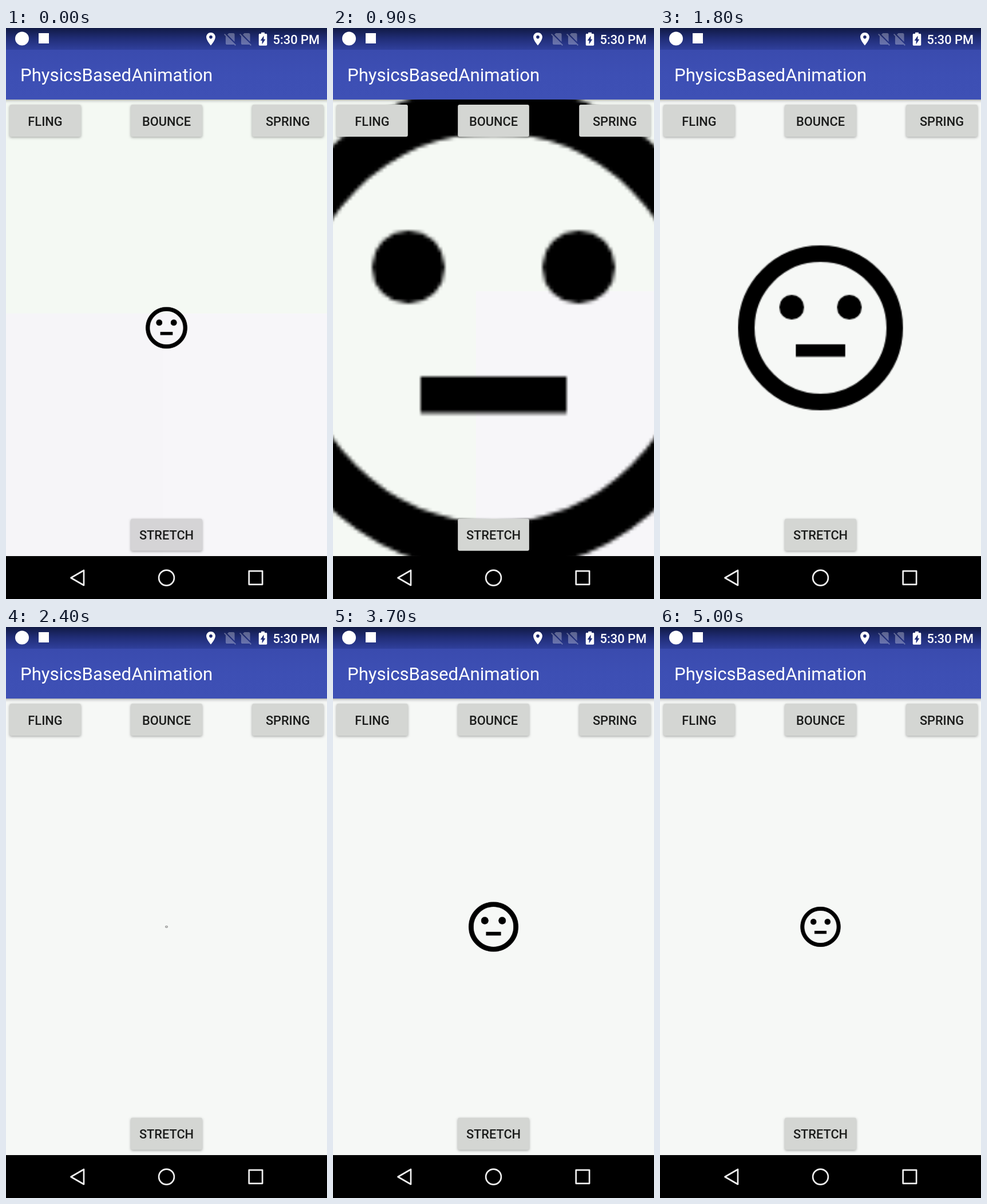
An HTML page with a canvas that plays this animation: 561x998 px, repeating every 5.1 s.

```html
<!DOCTYPE html>
<html lang="en">
<head>
<meta charset="utf-8">
<title>Spring stretch</title>
<style>
html, body { margin: 0; width: 100%; height: 100%; overflow: hidden; background: #000; }
canvas { display: block; }
</style>
</head>
<body>
<canvas id="stage" width="561" height="998"></canvas>
<script>
const W = 561, TOP = 125, BOTTOM = 923, CX = 280.5, CY = 524;
const LOOP = 5100, STEP = 100, START = 0.703;
const DP = W / 360;
const ctx = document.getElementById('stage').getContext('2d');

const PIN = new Path2D('M12 2C8.13 2 5 5.13 5 9c0 5.25 7 13 7 13s7-7.75 7-13c0-3.87-3.13-7-7-7zm0 9.5a2.5 2.5 0 0 1 0-5 2.5 2.5 0 0 1 0 5z');
const NO_SIM = new Path2D('M18.99 5c0-1.1-.89-2-1.99-2h-7L7.66 5.34 19 16.68zM3.65 3.88L2.38 5.15 5 7.77V19c0 1.1.9 2 2 2h10.01c.35 0 .67-.1.96-.26l1.88 1.88 1.27-1.27z');
const BATTERY = new Path2D('M15.67 4H14V2h-4v2H8.33C7.6 4 7 4.6 7 5.33v15.33C7 21.4 7.6 22 8.33 22h7.33c.74 0 1.34-.6 1.34-1.33V5.33C17 4.6 16.4 4 15.67 4zM11 20v-5.5H9L13 7v5.5h2z');

// The face is a 56dp bitmap at 3x density, so it softens as it is stretched.
const FACE = 56 * DP;
const face = makeFace(168);

function makeFace(size) {
  const c = document.createElement('canvas');
  c.width = c.height = size;
  const g = c.getContext('2d');
  g.scale(size / 24, size / 24);
  g.lineWidth = 2;
  g.beginPath();
  g.arc(12, 12, 9, 0, 7);
  g.stroke();
  for (const x of [8.5, 15.5]) {
    g.beginPath();
    g.arc(x, 9.5, 1.5, 0, 7);
    g.fill();
  }
  g.fillRect(9, 14, 6, 1.5);
  return c;
}

// Underdamped spring: stiffness 50, damping ratio 0.2, start velocity 100/s.
function springScale(t) {
  const s = t - START;
  if (s <= 0) return 1;
  const w = Math.sqrt(50), z = 0.2, wd = w * Math.sqrt(1 - z * z);
  return 1 + 100 / wd * Math.exp(-z * w * s) * Math.sin(wd * s);
}

function rect(color, x, y, w, h) {
  ctx.fillStyle = color;
  ctx.fillRect(x, y, w, h);
}

function label(str, x, y, weight, size, color, align) {
  ctx.font = `${weight} ${size}px Roboto, sans-serif`;
  ctx.textAlign = align;
  ctx.fillStyle = color;
  ctx.fillText(str, x, y);
}

function icon(path, x, y, sx, sy, color) {
  ctx.save();
  ctx.translate(x, y);
  ctx.scale(sx, sy);
  ctx.fillStyle = color;
  ctx.fill(path, 'evenodd');
  ctx.restore();
}

function gradient(y0, y1, ...colors) {
  const g = ctx.createLinearGradient(0, y0, 0, y1);
  colors.forEach((c, i) => g.addColorStop(i / (colors.length - 1), c));
  return g;
}

function background(t) {
  const h = BOTTOM - TOP;
  if (t >= 1.2) {
    rect('#f6f8f6', 0, TOP, W, h);
  } else if (t >= 0.8) {
    rect('#f5f9f4', 0, TOP, W, h);
    rect('#f7f6f9', 250, 460, W - 250, BOTTOM - 460);
  } else {
    rect('#f4f9f3', 0, TOP, W, h);
    rect('#f7f6f9', 0, 499, W, BOTTOM - 499);
    rect('#f6f5f8', 0, 499, 275, BOTTOM - 499);
  }
}

function drawFace(scale) {
  ctx.save();
  ctx.translate(CX, CY);
  ctx.scale(scale, scale);
  ctx.imageSmoothingQuality = Math.abs(scale) > 2 ? 'low' : 'high';
  ctx.drawImage(face, -FACE / 2, -FACE / 2, FACE, FACE);
  ctx.restore();
}

function button(str, cx, y, color) {
  const w = 80 * DP, h = 36 * DP;
  ctx.save();
  ctx.shadowColor = 'rgba(0,0,0,.32)';
  ctx.shadowBlur = 4;
  ctx.shadowOffsetY = 1.5;
  ctx.fillStyle = color;
  ctx.beginPath();
  ctx.roundRect(cx - w / 2, y, w, h, 3);
  ctx.fill();
  ctx.restore();
  label(str, cx, y + 36.7, 500, 14 * DP, '#1b1c1b', 'center');
}

function statusBar() {
  rect(gradient(0, 38, '#111a45', '#212e78', '#30409c'), 0, 0, W, 38);
  ctx.fillStyle = '#fff';
  ctx.beginPath();
  ctx.arc(28, 18.5, 12, 0, 7);
  ctx.fill();
  ctx.fillRect(57, 9, 18, 18);
  icon(PIN, 344.4, 5.7, 1.13, 1.13, '#fff');
  for (const x of [378.3, 405.3]) icon(NO_SIM, x, 5.6, 1.12, 1.12, 'rgba(255,255,255,.3)');
  icon(BATTERY, 431.6, 5.4, 1.45, 1.15, '#fff');
  label('5:30 PM', 548, 27.5, 500, 14 * DP, '#fff', 'right');
}

function toolbar() {
  rect(gradient(TOP, TOP + 7, 'rgba(0,0,0,.26)', 'rgba(0,0,0,.07)', 'rgba(0,0,0,0)'), 0, TOP, W, 7);
  rect(gradient(38, TOP, '#3a4bae', '#3d4fb4', '#3e50b5'), 0, 38, W, TOP - 38);
  label('PhysicsBasedAnimation', 25, 93, 400, 20 * DP, '#fff', 'left');
}

function navBar() {
  rect('#000', 0, BOTTOM, W, 998 - BOTTOM);
  ctx.strokeStyle = '#f0f0f0';
  ctx.lineWidth = 2.7;
  ctx.lineJoin = 'round';
  ctx.beginPath();
  ctx.moveTo(113.5, 961);
  ctx.lineTo(136, 948);
  ctx.lineTo(136, 974);
  ctx.closePath();
  ctx.stroke();
  ctx.beginPath();
  ctx.arc(CX, 961, 13.4, 0, 7);
  ctx.stroke();
  ctx.strokeRect(424.7, 949.2, 23.4, 23.4);
}

function draw(t) {
  background(t);
  drawFace(springScale(t));
  const gray = '#d4d6d3';
  button('FLING', 68.5, 134, gray);
  button('BOUNCE', CX, 134, gray);
  button('SPRING', 492.5, 134, gray);
  button('STRETCH', CX, 857.7, t < 0.8 ? '#d5d4d6' : gray);
  toolbar();
  statusBar();
  navBar();
}

let begin = null;
function tick(now) {
  if (begin === null) begin = now;
  const ms = (now - begin) % LOOP;
  draw(Math.floor(ms / STEP) * STEP / 1000);
  requestAnimationFrame(tick);
}
draw(0);
requestAnimationFrame(tick);
</script>
</body>
</html>
```
